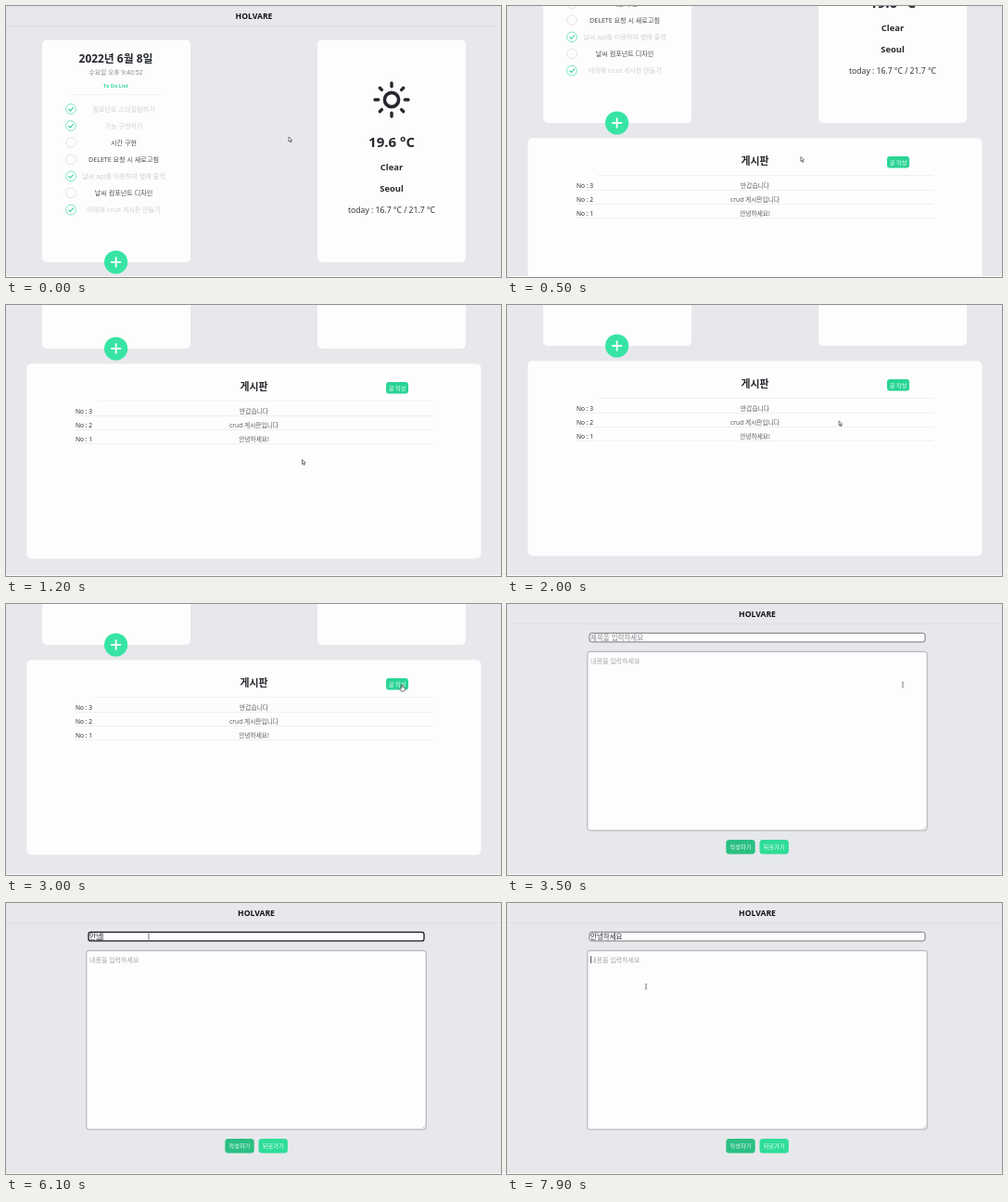
Recreate the animation shown at these times as an HTML page with a canvas. Size 534x292 px, loop 8 s.

```html
<!DOCTYPE html>
<html lang="ko">
<head>
<meta charset="utf-8">
<title>HOLVARE</title>
<style>
html, body { margin: 0; width: 100%; height: 100%; overflow: hidden; background: #e7e8ec; }
canvas { display: block; width: 534px; height: 292px; }
</style>
</head>
<body>
<canvas id="stage"></canvas>
<script>
const W = 534, H = 292, LOOP = 8000;
const FONT = '"Noto Sans", "Noto Sans CJK KR", "Noto Sans CJK", sans-serif';
const BG = '#e7e8ec', PAPER = '#fdfdfe', DARK = '#25282c', MINT = '#38e4a4';
const canvas = document.getElementById('stage');
const ctx = canvas.getContext('2d');
const dpr = window.devicePixelRatio || 1;
canvas.width = W * dpr;
canvas.height = H * dpr;

const PAGE_SWITCH = 3300, TITLE_FOCUS = 4300, BODY_FOCUS = 7600;

// Keys are [time, value...]
const SCROLL = [[0, 0], [100, 12], [200, 45], [300, 85], [500, 150], [700, 188],
  [900, 206], [1200, 229], [1400, 232]];
const MOUSE = [[0, 305, 141], [200, 309, 150], [600, 319.5, 166.5], [1400, 319.5, 166.5],
  [1850, 333, 141], [2250, 400, 98], [2600, 427, 87], [3700, 427, 87],
  [4200, 154, 36], [7250, 154, 36], [7550, 150, 90]];
const TYPING = [[5300, 'ㅇ'], [5450, '아'], [5600, '안'], [5750, '안ㄴ'], [5850, '안녀'],
  [6000, '안녕'], [6400, '안녕ㅎ'], [6500, '안녕하'], [6620, '안녕핫'],
  [6750, '안녕하세'], [6880, '안녕하셍'], [7000, '안녕하세요']];
const TODOS = [
  ['컴포넌트 스타일링하기', 1], ['기능 구현하기', 1], ['시간 구현', 0],
  ['DELETE 요청 시 새로고침', 0], ['날씨 api를 이용하여 옆에 출력', 1],
  ['날씨 컴포넌트 디자인', 0], ['아래에 crud 게시판 만들기', 1]];
const POSTS = ['반갑습니다', 'crud 게시판입니다', '안녕하세요!'];

function track(keys, t) {
  let i = keys.length - 1;
  while (i > 0 && keys[i][0] > t) i--;
  const a = keys[i], b = keys[i + 1];
  if (!b) return a.slice(1);
  const k = (t - a[0]) / (b[0] - a[0]);
  return a.slice(1).map((v, n) => v + (b[n + 1] - v) * k);
}

// y is the visual middle of the line
function text(str, x, y, size, color, bold, align = 'center') {
  ctx.font = (bold ? '700 ' : '400 ') + size + 'px ' + FONT;
  ctx.textAlign = align;
  ctx.fillStyle = color;
  ctx.fillText(str, x, y + size * 0.36);
}

function box(x, y, w, h, r, fill, stroke, lw = 1) {
  ctx.beginPath();
  ctx.roundRect(x, y, w, h, r);
  ctx.fillStyle = fill;
  ctx.fill();
  if (stroke) {
    ctx.strokeStyle = stroke;
    ctx.lineWidth = lw;
    ctx.stroke();
  }
}

function path(points, color, lw) {
  ctx.beginPath();
  points.forEach(([x, y]) => ctx.lineTo(x, y));
  ctx.strokeStyle = color;
  ctx.lineWidth = lw;
  ctx.stroke();
}

function rule(x1, x2, y, color = '#f0f0f2') {
  ctx.fillStyle = color;
  ctx.fillRect(x1, y, x2 - x1, 1);
}

function ring(x, y, r, color, lw) {
  ctx.beginPath();
  ctx.arc(x, y, r, 0, Math.PI * 2);
  ctx.strokeStyle = color;
  ctx.lineWidth = lw;
  ctx.stroke();
}

function header(x) {
  text('HOLVARE', x, 11, 8.6, '#141414', true);
  rule(0, W, 21, '#dddee2');
}

function todoCard() {
  box(39, 36.5, 160, 239.5, 5, PAPER);
  text('2022년 6월 8일', 118.5, 57, 11.9, DARK, true);
  text('수요일 오후 9:40:52', 118.5, 71.5, 6.8, '#858a90');
  text('To Do List', 118.5, 86, 5.6, '#36d6a0', true);
  rule(69, 169, 95, '#f2f2f4');
  TODOS.forEach(([label, done], i) => {
    const y = 111 + i * 18.1;
    ring(70, y, 5.4, done ? '#5fe0b4' : '#dcdcde', 0.8);
    if (done) path([[67.4, y], [69.4, y + 1.9], [72.8, y - 1.9]], '#2fd29a', 1.1);
    text(label, 127, y, 7.1, done ? '#cdcfd2' : '#4a4d50');
  });
  ctx.beginPath();
  ctx.arc(118.6, 276, 12.6, 0, Math.PI * 2);
  ctx.fillStyle = MINT;
  ctx.fill();
  path([[113, 276], [124.2, 276]], '#fff', 1.8);
  path([[118.6, 270.4], [118.6, 281.6]], '#fff', 1.8);
}

function sun(x, y) {
  ring(x, y, 7.6, DARK, 3.6);
  ctx.lineCap = 'round';
  for (let i = 0; i < 8; i++) {
    const a = i * Math.PI / 4, near = i % 2 ? 15 : 14.3;
    const c = Math.cos(a), s = Math.sin(a);
    path([[x + c * near, y + s * near], [x + c * 18, y + s * 18]], DARK, 3.4);
  }
  ctx.lineCap = 'butt';
}

function weatherCard() {
  box(336, 36.5, 160, 239.5, 5, PAPER);
  sun(416, 101);
  text('19.6 °C', 416, 147, 15, DARK, true);
  text('Clear', 416, 173.5, 9.4, DARK, true);
  text('Seoul', 416, 197, 9.4, DARK, true);
  text('today : 16.7 °C / 21.7 °C', 416, 219.5, 8.6, '#36393d');
}

function board() {
  box(22.5, 292.3, 490, 210, 5, PAPER);
  text('게시판', 267.5, 317, 10.9, DARK, true);
  box(410, 312, 24, 12.5, 3, '#2bd494');
  text('글 작성', 422, 318.3, 6.2, '#e9fff6');
  rule(98, 460, 332);
  POSTS.forEach((post, i) => {
    const y = 343.5 + i * 15;
    text('No : ' + (3 - i), 75, y, 6.6, '#2c2f33', false, 'left');
    text(post, 267.5, y, 6.7, '#5a5d61');
    rule(75, 460, y + 4.5);
  });
}

function mainPage(t) {
  ctx.save();
  ctx.translate(0, -Math.round(track(SCROLL, t)[0]));
  header(267.5);
  todoCard();
  weatherCard();
  board();
  ctx.restore();
}

function caret(x, y, since, t) {
  if ((t - since) % 1000 < 500) {
    ctx.fillStyle = '#222';
    ctx.fillRect(x, y - 4, 0.7, 8);
  }
}

function titleField(t) {
  const focused = t >= TITLE_FOCUS && t < BODY_FOCUS;
  box(89, 31.3, 362, 9.6, 2.5, PAPER, focused ? '#16181c' : '#55585c', focused ? 1.3 : 0.8);
  const typed = TYPING.filter(k => k[0] <= t).pop();
  if (!typed) {
    text('제목을 입력하세요', 90, 36, 7.5, '#85878b', false, 'left');
    if (focused) caret(90.3, 36, TITLE_FOCUS, t);
    return;
  }
  text(typed[1], 90, 36, 7.5, '#2a2c30', false, 'left');
  if (!focused) return;
  const end = 90 + ctx.measureText(typed[1]).width;
  const start = 90 + ctx.measureText(typed[1].slice(0, -1)).width;
  ctx.fillStyle = '#333';
  ctx.fillRect(start, 39.5, end - start, 0.6);
  caret(end, 36, typed[0], t);
}

function writePage(t) {
  header(270);
  titleField(t);
  box(86.8, 51.3, 366.4, 192.7, 2.5, PAPER, '#a2a4a8', 0.9);
  path([[449, 242.8], [452, 239.8]], '#999', 0.5);
  path([[450.8, 242.8], [452, 241.6]], '#999', 0.5);
  text('내용을 입력하세요', 90, 61, 7, '#a3a5a9', false, 'left');
  if (t >= BODY_FOCUS) caret(90.2, 61, BODY_FOCUS, t);
  box(236.3, 254, 31.4, 15.5, 3.5, '#2abf82');
  text('작성하기', 252, 261.8, 6.2, '#f2fff9');
  box(272.5, 254, 31.4, 15.5, 3.5, '#2fdd98');
  text('뒤로가기', 288.2, 261.8, 6.2, '#f2fff9');
}

function shape(x, y, points) {
  ctx.beginPath();
  points.forEach(([dx, dy]) => ctx.lineTo(x + dx, y + dy));
  ctx.closePath();
  ctx.fillStyle = '#fff';
  ctx.fill();
  ctx.strokeStyle = '#3c3e42';
  ctx.lineWidth = 0.7;
  ctx.stroke();
}

function pointer(t) {
  const [x, y] = track(MOUSE, t);
  if (t >= PAGE_SWITCH) {
    path([[x, y - 2.6], [x, y + 2.6]], '#55585c', 0.8);
    path([[x - 1.4, y - 2.8], [x + 1.4, y - 2.8]], '#77797d', 0.6);
    path([[x - 1.4, y + 2.8], [x + 1.4, y + 2.8]], '#77797d', 0.6);
  } else if (x > 410 && y < 93) {
    shape(x, y, [[-0.6, 0], [0.6, 0], [0.8, 2.4], [3.6, 3.2], [3.4, 5.6], [2.8, 7],
      [-0.6, 7], [-2.4, 4.2], [-1.8, 3.6], [-0.6, 4.4]]);
  } else {
    shape(x, y, [[0, 0], [0, 5], [1.1, 4.1], [2, 6], [2.8, 5.6], [2, 3.8], [3.6, 3.6]]);
  }
}

function draw(now) {
  const t = now % LOOP;
  ctx.setTransform(dpr, 0, 0, dpr, 0, 0);
  ctx.fillStyle = BG;
  ctx.fillRect(0, 0, W, H);
  (t < PAGE_SWITCH ? mainPage : writePage)(t);
  pointer(t);
  rule(0, W, 291, '#fafafb');
}

let begin;
function frame(now) {
  begin ??= now;
  draw(now - begin);
  requestAnimationFrame(frame);
}
draw(0);
requestAnimationFrame(frame);
</script>
</body>
</html>
```
